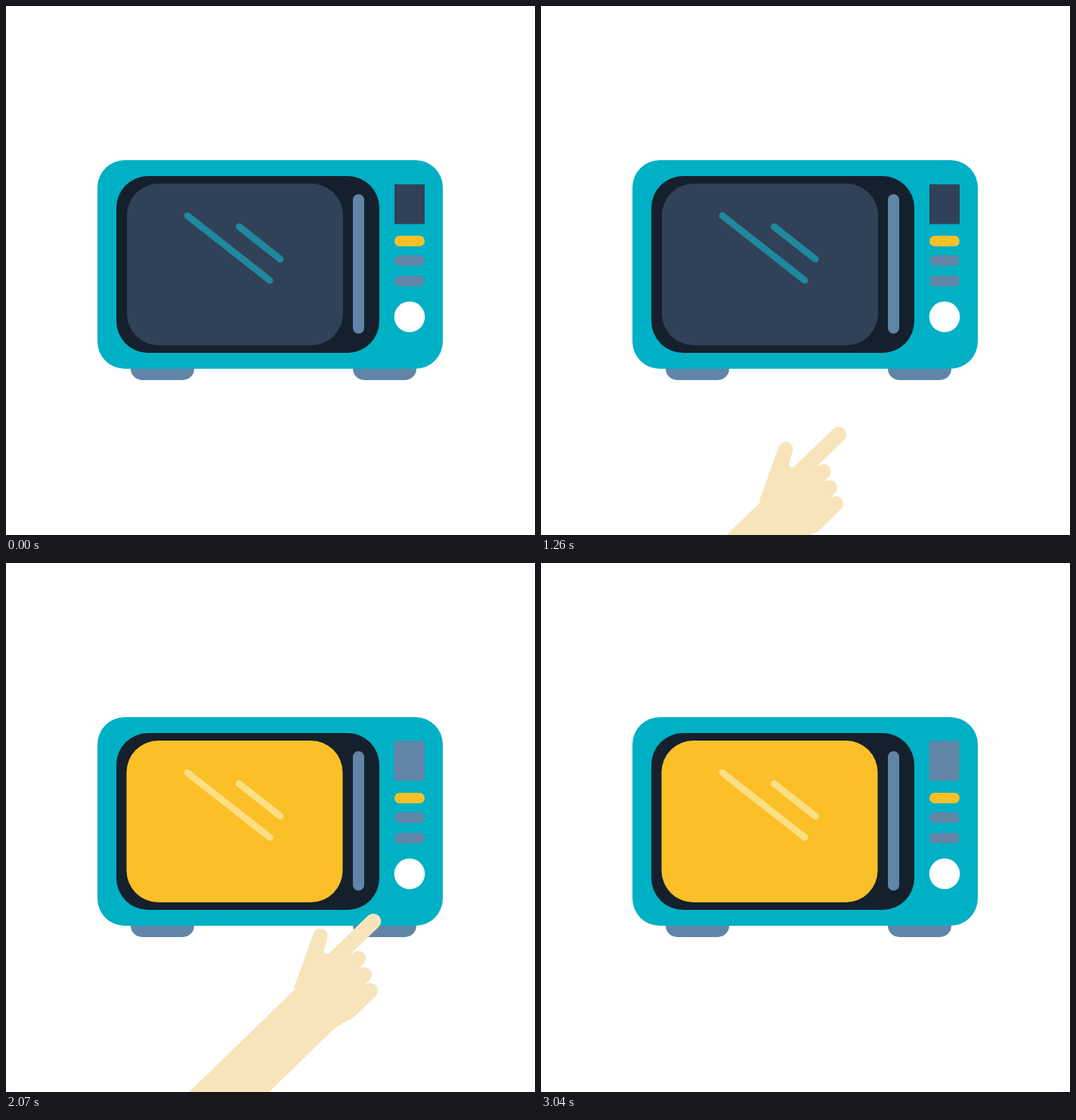
Animation of 700x700 px, one loop 4010 ms. Source, as an HTML page with a canvas:

```html
<!DOCTYPE html>
<html lang="en">
<head>
<meta charset="utf-8">
<title>Microwave</title>
<style>
  html, body { margin: 0; width: 100%; height: 100%; overflow: hidden; background: #fff; }
  canvas { display: block; width: 700px; height: 700px; }
</style>
</head>
<body>
<canvas id="stage" width="700" height="700"></canvas>
<script>
const ctx = document.getElementById('stage').getContext('2d');

const LOOP = 4010, ENTER = 770, PRESS = 1830, LEAVE = 3040;
const TICK = 30, HOLD = 130;
const TEAL = '#00b0c5', BLACK = '#15202d', NAVY = '#314158', STEEL = '#6185a7';
const YELLOW = '#fbc028', SKIN = '#f7e4bb', WHITE = '#fff';

function box(x, y, w, h, r, color) {
  ctx.fillStyle = color;
  ctx.beginPath();
  ctx.roundRect(x, y, w, h, r);
  ctx.fill();
}

function line(x1, y1, x2, y2, width, color) {
  ctx.strokeStyle = color;
  ctx.lineWidth = width;
  ctx.lineCap = 'round';
  ctx.beginPath();
  ctx.moveTo(x1, y1);
  ctx.lineTo(x2, y2);
  ctx.stroke();
}

function drawMicrowave(lit) {
  for (const x of [165, 459]) box(x, 465, 84, 30, 16, STEEL);
  box(121, 204, 457, 276, 36, TEAL);
  box(146, 225, 348, 234, 42, BLACK);
  box(lit ? 159.5 : 160, 235, 286, 214, 42, lit ? YELLOW : NAVY);

  const shine = lit ? '#fcdf84' : '#1e899f';
  line(240, 277.5, 349, 363, 9, shine);
  line(308.5, 292, 363, 335, 9, shine);
  box(459, 249, 15, 184.5, 7.5, STEEL);

  const shift = lit ? -0.5 : 0;
  box(514 + shift, 236 + shift, 40, 52.5, 0, lit ? STEEL : NAVY);
  box(514, 304, 40, 14, 7, YELLOW);
  box(514, 330, 40, 14, 7, STEEL);
  box(514, 357, 40, 14, 7, STEEL);

  ctx.fillStyle = WHITE;
  ctx.beginPath();
  ctx.arc(534, 411.3, 20.3, 0, Math.PI * 2);
  ctx.fill();
}

// Drawn in its pressing pose, then moved by (dx, dy).
function drawHand(dx, dy) {
  ctx.save();
  ctx.translate(dx, dy);
  line(528, 415, 470, 471, 20.5, SKIN);
  line(458, 434, 434, 502, 19, SKIN);
  for (const [x, y] of [[508, 464], [516, 485.5], [524, 506.5]]) {
    line(x, y, x - 28, y + 27, 20, SKIN);
  }

  ctx.fillStyle = SKIN;
  ctx.beginPath();
  ctx.moveTo(467, 437);
  ctx.lineTo(462.5, 454);
  ctx.quadraticCurveTo(462.5, 459, 467, 458);
  ctx.lineTo(500, 457);
  ctx.lineTo(511, 475);
  ctx.lineTo(517, 496);
  ctx.lineTo(531, 513.5);
  ctx.lineTo(501, 543);
  ctx.quadraticCurveTo(484, 550, 473, 560);
  ctx.lineTo(-27, 1048);
  ctx.lineTo(-135, 1048);
  ctx.lineTo(424.5, 504.5);
  ctx.quadraticCurveTo(423, 503, 424, 500);
  ctx.lineTo(449, 431);
  ctx.fill();
  ctx.restore();
}

// The first and last poses are held longer than the rest.
function handShift(t) {
  if (t < ENTER || t >= LEAVE) return null;
  if (t < PRESS + TICK) {
    const step = Math.max(0, Math.floor((t - ENTER - HOLD) / TICK) + 1);
    const left = 32 - step;
    return [-7.06 * left, 8 * left];
  }
  const step = Math.min(36, Math.floor((t - PRESS) / TICK));
  return [-5.24 * step, 7.4 * step];
}

const start = performance.now();

function draw() {
  const t = (performance.now() - start) % LOOP;
  ctx.fillStyle = WHITE;
  ctx.fillRect(0, 0, 700, 700);
  drawMicrowave(t >= PRESS + TICK);
  const shift = handShift(t);
  if (shift) drawHand(...shift);
  requestAnimationFrame(draw);
}
draw();
</script>
</body>
</html>
```
